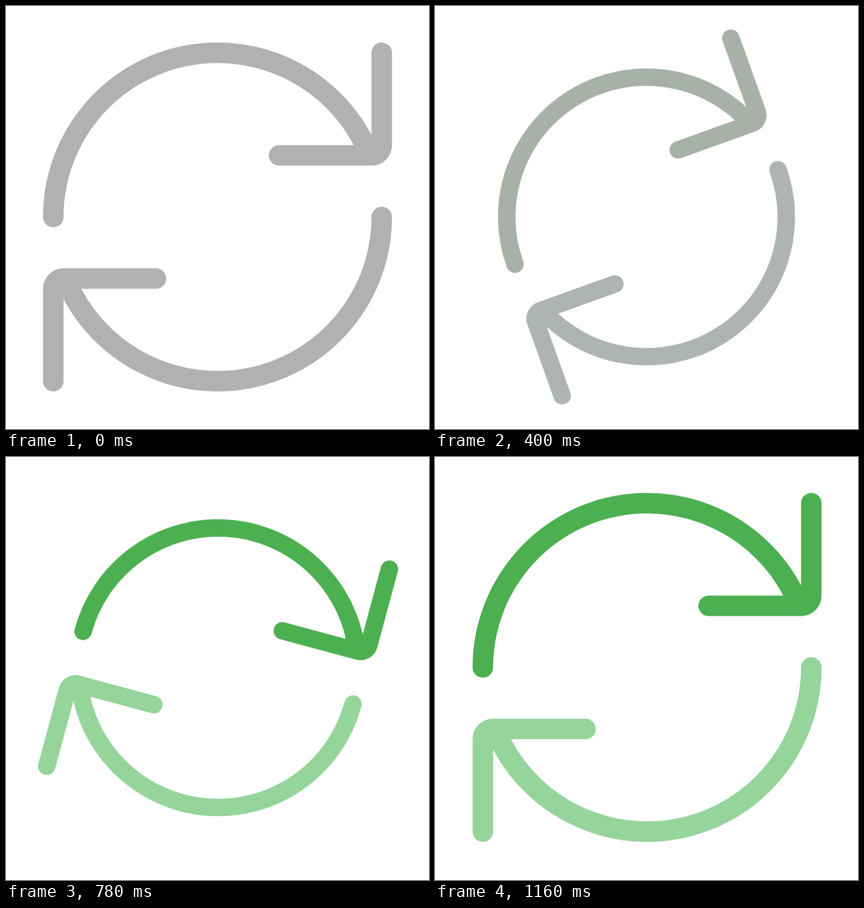
An HTML page without scripts for the animation above (1200 ms loop, 748x748 px).

```html
<!DOCTYPE html>
<html lang="en">
<head>
<meta charset="utf-8">
<title>Refresh</title>
<style>
  html, body { margin: 0; width: 100%; height: 100%; overflow: hidden; background: #fff; }
  svg { display: block; width: 100%; height: 100%; }

  .spin, .size, .nudge, .arrow { animation: 1200ms linear infinite; transform-origin: 0 0; }
  .nudge { animation-name: nudge; }
  .spin { animation-name: spin; }
  .size { animation-name: size; }
  .arrow {
    animation-name: tint;
    fill: none;
    stroke-width: 1;
    stroke-linecap: round;
  }
  .top { --tint: #4caf50; }
  .bottom { --tint: #95d49a; }

  /* shrink, wind up, whirl past a full turn, settle, grow back */
  @keyframes size {
    0% { transform: scale(1); }
    18.75%, 77.9% { transform: scale(.851); }
    96.7%, 100% { transform: scale(1); }
  }
  @keyframes spin {
    0%, 18.75% { transform: rotate(0deg); }
    34.5%, 45% { transform: rotate(-21.2deg); }
    46.667% { transform: rotate(20deg); }
    61.667% { transform: rotate(380deg); }
    65% { transform: rotate(375.2deg); }
    77.1%, 100% { transform: rotate(360deg); }
  }
  @keyframes nudge {
    0%, 45% { transform: translate(0, 0); }
    46.667% { transform: translate(1px, 0); }
    96.7%, 100% { transform: translate(1px, -1px); }
  }
  @keyframes tint {
    0%, 30.5% { stroke: #b1b1b1; }
    61.2%, 100% { stroke: var(--tint); }
  }
</style>
</head>
<body>
<svg viewBox="0 0 748 748">
  <defs>
    <path id="arrow" d="M-8 0A8 8 0 0 1 7.4 -3.04M8 -8V-3.5A.5 .5 0 0 1 7.5 -3H3"/>
  </defs>
  <g transform="translate(374 373)">
    <g class="nudge"><g class="spin"><g class="size">
      <g transform="scale(36.3)">
        <g class="arrow bottom"><use href="#arrow" transform="rotate(180)"/></g>
        <g class="arrow top"><use href="#arrow"/></g>
      </g>
    </g></g></g>
  </g>
</svg>
</body>
</html>
```
